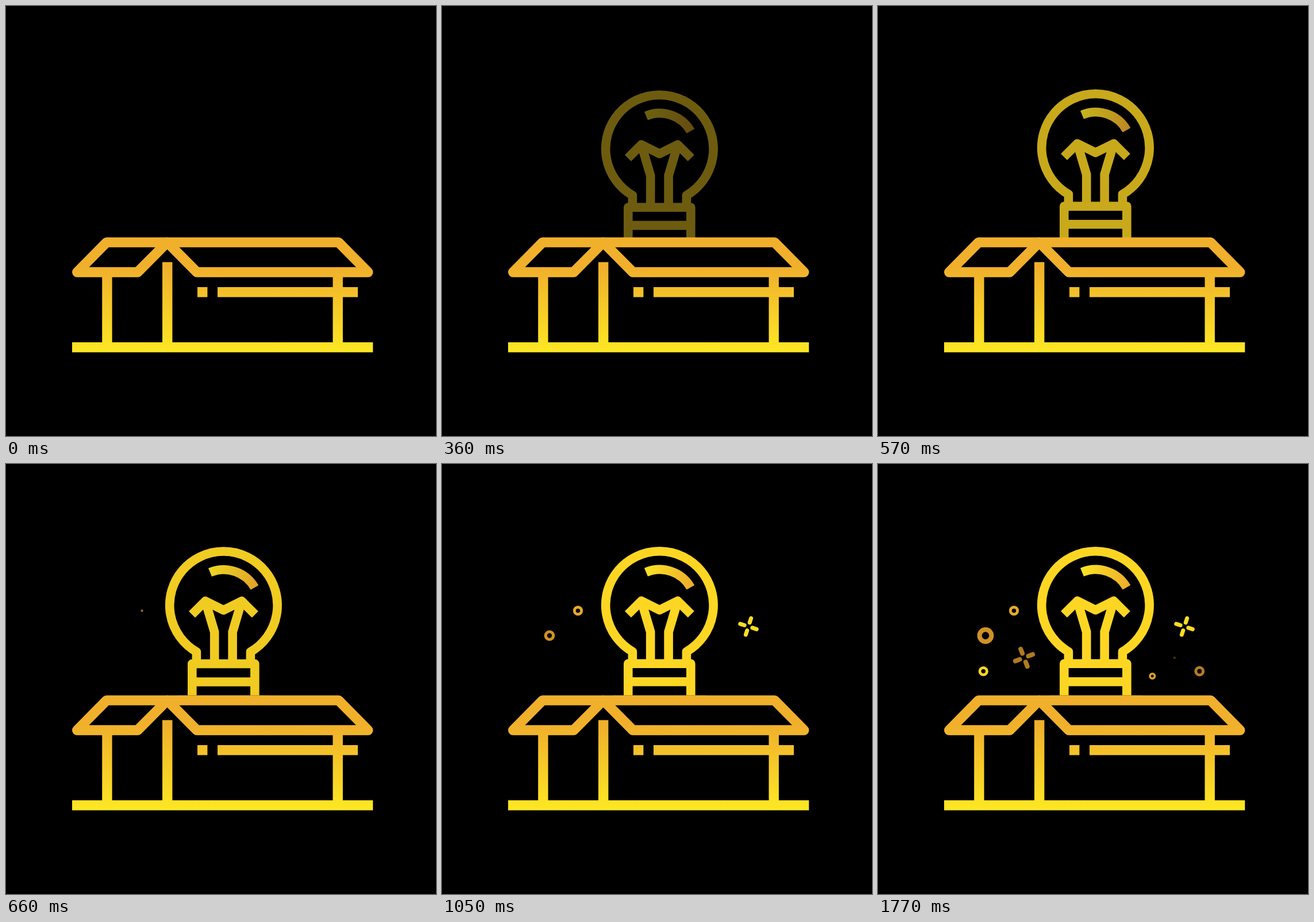
An HTML page for the animation above (1.8 s loop, 748 by 748 pixels).

```html
<!DOCTYPE html>
<html lang="en">
<head>
<meta charset="utf-8">
<title>Idea box</title>
<style>
  html, body { margin: 0; width: 100%; height: 100%; overflow: hidden; background: #000; }
  svg { display: block; width: 100%; height: 100%; }
</style>
</head>
<body>
<svg viewBox="0 0 748 748" fill="none" stroke-linejoin="round">
  <defs>
    <linearGradient id="boxFill" gradientUnits="userSpaceOnUse" x1="0" y1="455" x2="0" y2="598">
      <stop offset="0" stop-color="#f0b02c"/>
      <stop offset="1" stop-color="#fde624"/>
    </linearGradient>
    <linearGradient id="shine" gradientUnits="userSpaceOnUse" x1="355" y1="187" x2="436" y2="210">
      <stop offset="0" stop-color="#fae123"/>
      <stop offset="1" stop-color="#eeae2c"/>
    </linearGradient>
  </defs>

  <g id="bulb" stroke="#fdd623" stroke-width="15.6">
    <path d="M331.4 347V326.5A93.7 93.7 0 1 1 425.4 326.5V347"/>
    <path d="M323.8 408V347.3H432.8V408M323.8 378.7H432.8"/>
    <path d="M323.5 261.5L346.8 238.3L378.4 254L410 238.3L433.3 261.5"/>
    <path d="M346.8 238.3L362.7 292V347M410 238.3L394.1 292V347"/>
    <path d="M355 188.3A62 62 0 0 1 432.5 214.7" stroke="url(#shine)"/>
  </g>

  <g stroke="url(#boxFill)" stroke-width="17.4">
    <path d="M123.7 463L175 411.1H280.5L229 463Z"/>
    <path d="M280.5 411.1L332 463H629.8L578.5 411.1Z"/>
    <path d="M175.9 463V594M280.7 445.5V594M577.2 463V594"/>
    <!-- rects avoid the empty bounding boxes of straight lines -->
    <g fill="url(#boxFill)" stroke="none">
      <rect x="115" y="585" width="523.3" height="17.4"/>
      <rect x="333" y="489" width="17.4" height="17.4"/>
      <rect x="368" y="489" width="244" height="17.4"/>
    </g>
  </g>
  <path id="seam" d="M298 402.5H460" stroke="#a87820" stroke-opacity=".6"/>

  <g id="sparks"></g>
</svg>
<script>
const LOOP = 1800, STEP = 30, GROW = 160;
const $ = id => document.getElementById(id);
const clamp = v => Math.min(1, Math.max(0, v));

const ring = (start, x, y, color, r, width) =>
  ({ start, x, y, color, width, d: `M${-r} 0A${r} ${r} 0 1 1 ${r} 0A${r} ${r} 0 1 1 ${-r} 0Z` });

function star(start, x, y, color, inner, outer, width, tilt) {
  let d = '';
  for (let i = 0; i < 4; i++) {
    const a = (tilt + i * 90) * Math.PI / 180, c = Math.cos(a), s = Math.sin(a);
    d += `M${inner * c} ${inner * s}L${outer * c} ${outer * s}`;
  }
  return { start, x, y, color, width, d };
}

const sparks = [
  ring(625, 236.5, 255.2, '#e9a92c', 6.2, 4.8),
  star(785, 533, 282.7, '#fbdc25', 7.2, 15, 7, 18),
  ring(946, 187, 298.5, '#d09125', 10.4, 8),
  ring(1100, 477.3, 369, '#dfa22a', 4.2, 3.6),
  star(1245, 254, 337, '#b07a20', 8, 16.2, 8, -21),
  ring(1420, 559.2, 360.5, '#b57c20', 6.4, 5),
  ring(1580, 183.3, 360.5, '#f9d524', 6.2, 4.8),
  star(1746, 515.7, 337, '#b07a20', 6, 12.5, 6, 18)
];

for (const s of sparks) {
  s.el = document.createElementNS('http://www.w3.org/2000/svg', 'path');
  const attrs = { d: s.d, stroke: s.color, 'stroke-width': s.width, 'stroke-linecap': 'round' };
  for (const k in attrs) s.el.setAttribute(k, attrs[k]);
  $('sparks').append(s.el);
}

function draw(ms) {
  const t = Math.floor(ms % LOOP / STEP) * STEP;
  const rise = t < 150 ? 0 : clamp((t - 110) / 580);
  $('bulb').setAttribute('opacity', rise);
  $('bulb').setAttribute('transform', `translate(0 ${5.2 * (1 - rise)})`);
  $('seam').setAttribute('visibility', rise > 0.9 ? 'visible' : 'hidden');
  for (const s of sparks) {
    const k = clamp((t - s.start) / GROW);
    s.el.setAttribute('visibility', k ? 'visible' : 'hidden');
    s.el.setAttribute('transform', `translate(${s.x} ${s.y}) scale(${k})`);
  }
}

const began = performance.now();
function tick() {
  draw(performance.now() - began);
  requestAnimationFrame(tick);
}
tick();
</script>
</body>
</html>
```
